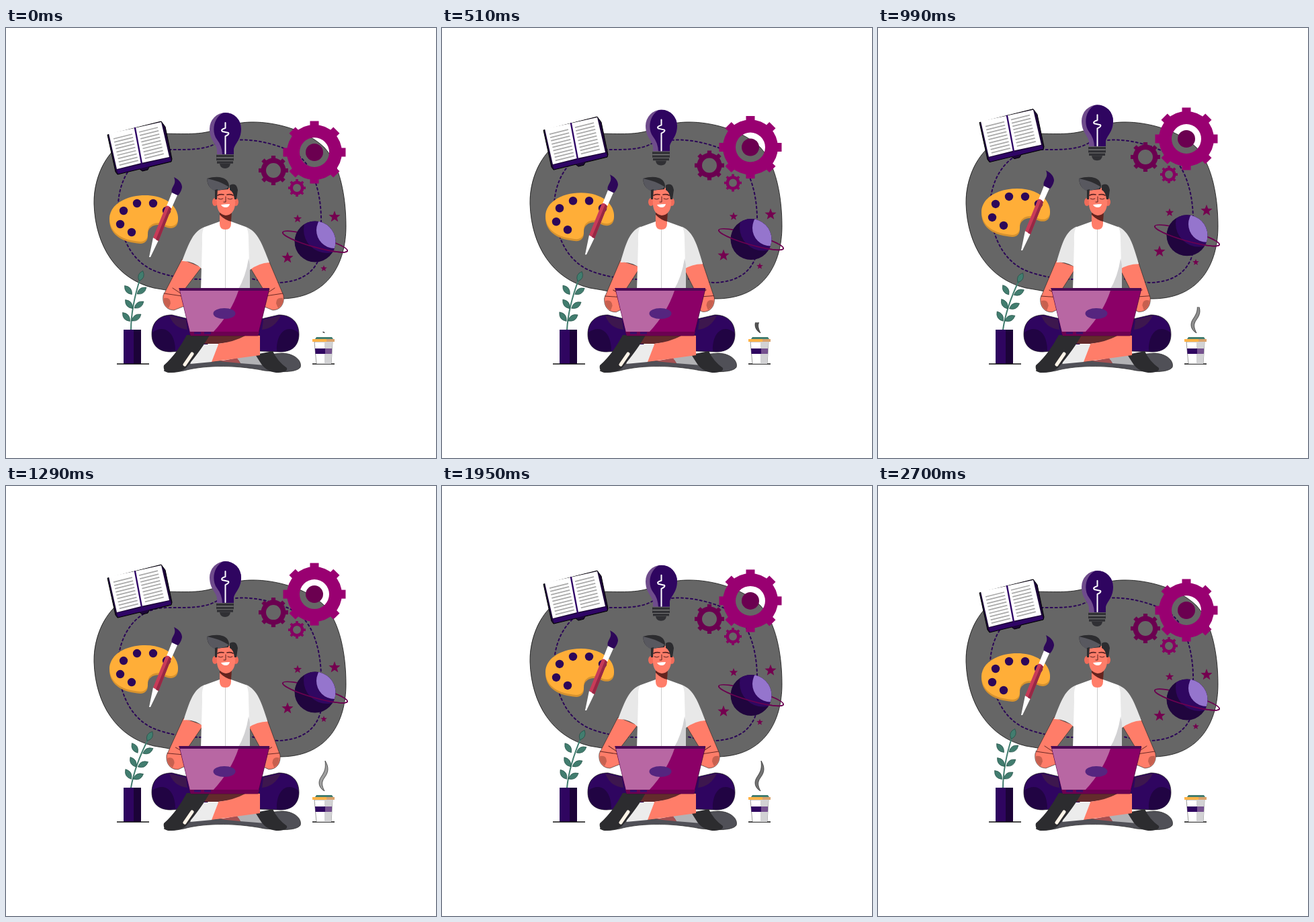
Write an HTML page that moves like this. It is 640 by 640 pixels and loops after 2760 ms.

```html
<!DOCTYPE html>
<html lang="en">
<head>
<meta charset="utf-8">
<title>Creative work</title>
<style>
  html, body { margin: 0; width: 100%; height: 100%; overflow: hidden; background: #fff; }
  svg { display: block; width: 100vw; height: 100vh; }
  .line { fill: none; stroke-linecap: round; stroke-linejoin: round; }
</style>
</head>
<body>
<svg viewBox="0 0 640 640">
  <defs>
    <clipPath id="globe"><circle cx="460" cy="318" r="30.5"/></clipPath>
    <clipPath id="reveal"><rect id="revealBox" x="460" width="26" height="60"/></clipPath>
    <clipPath id="glass"><path d="M314 188V181C313 172 303 167 303 150A23.5 24 0 0 1 350 150C350 167 340 172 339 181V188Z"/></clipPath>
  </defs>

  <path fill="#666" stroke="#111" stroke-width=".8" d="M131 262C130 215 158 157 220 157C262 157 285 160 310 152C338 142 352 140 368 140C400 140 446 151 474 178C497 203 506 250 506 295C506 350 480 402 410 403H300C270 396 245 391 220 387C165 374 133 325 131 262Z"/>
  <g class="line" stroke="#2b0657" stroke-width="2" stroke-dasharray="3 4">
    <path d="M314 171C296 182 270 181 240 181C190 181 166 228 167 268C170 320 193 353 228 364C256 373 275 374 300 374"/>
    <path d="M342 167C372 164 411 175 434 189C459 207 470 250 469 292C477 340 461 377 406 379Q385 378 365 373"/>
  </g>

  <g data-rise="22">
    <path fill="#1c0438" stroke="#000" d="M151 159L231 139 237 147 247 195 246 199 213 207 211 211 203 213 199 210 166 218 163 214Z"/>
    <path fill="#2f0566" d="M165 211L201 203 244 193 246 198 167 217Z"/>
    <path fill="#fff" d="M153 157L191 149 231 140 243 192 201 201 165 210Z"/>
    <path class="line" stroke="#2f0566" stroke-width="2.4" d="M192 149L202 202"/>
    <g id="rows" stroke="#aaa" stroke-width="1.8"></g>
  </g>

  <g data-rise="14">
    <g clip-path="url(#glass)">
      <path fill="#6f4c8c" d="M300 124h52v66h-52Z"/>
      <path fill="#2f0560" d="M326 125C309 131 305 154 314 166Q322 176 322 190H352V125Z"/>
    </g>
    <path class="line" stroke="#fff" stroke-width="2" d="M326.500 187V161Q333 158 331 156L322 154Q319 151 326.500 149V141"/>
    <path stroke="#777" stroke-width="13" d="M314 195h24"/>
    <path stroke="#303034" stroke-width="3.500" d="M313 190.500h26M313 195.500h26M314 200h24"/>
    <path fill="#303034" d="M318 202h16Q333 209 326 209T318 202Z"/>
  </g>

  <g id="gears" data-rise="24"></g>

  <g data-rise="12">
    <path id="palette" fill="#d6922f" transform="translate(0 3)" d="M154 284C154 263 178 249 207 249C236 249 257 264 256 285C254 296 245 297 235 292C224 287 211 292 211 304Q212 317 200 318C174 316 155 306 154 284Z"/>
    <use href="#palette" transform="translate(0 -3)" style="filter:brightness(1.19)"/>
    <g id="paints" fill="#2d0759"></g>
    <path fill="#2d0759" d="M247 246C244 236 255 234 250 222C257 225 262 231 262 237C261 243 258 247 256 249Z"/>
    <path fill="#fff" d="M247 245L255 249 246 269 239 265ZM219 312L227 316 215 341 213 341Z"/>
    <path fill="#c83b58" d="M238 265Q242 263 246 269L227 317 219 312Z"/>
    <path fill="#962845" d="M243 266L246 269 227 317 223 315Z"/>
  </g>

  <g data-rise="11">
    <ellipse class="line" cx="460" cy="318" rx="50" ry="8" transform="rotate(16 460 318)" stroke="#6b0050" stroke-width="1.700"/>
    <g clip-path="url(#globe)">
      <circle cx="460" cy="318" r="31" fill="#20053e"/>
      <circle cx="478" cy="300" r="35" fill="#300761"/>
      <circle cx="489" cy="301" r="27" fill="#9575cd"/>
    </g>
    <path class="line" transform="rotate(16 460 318)" stroke="#6b0050" stroke-width="1.700" d="M410 318A50 8 0 0 0 510 318"/>
    <g id="stars" fill="#74004f"></g>
  </g>

  <g id="plant" fill="#427d6f" stroke="#1d4a40" stroke-width=".6">
    <path class="line" stroke="#427d6f" stroke-width="2" d="M186 450Q186 415 200 372"/>
  </g>
  <path fill="#2f0560" d="M175 449h26v51h-26Z"/>
  <path fill="#1c0338" d="M190 449h11v51h-11Z"/>
  <path stroke="#111" stroke-width="1.500" d="M165 500h48M456 500h33"/>

  <path id="steam" clip-path="url(#reveal)" stroke="#222" stroke-width=".7" d="M475 409C481 419 480 426 474 434C469 441 470 446 474 454C465 449 464 440 469 433C475 424 476 420 475 409Z"/>
  <path fill="#fff" stroke="#333" stroke-width=".5" d="M459 467h27l-2 33h-22Z"/>
  <path fill="#d2d2d4" d="M474 467h12l-2 33h-10Z"/>
  <path fill="#2f0560" d="M460 477h25l-.5 8h-24Z"/>
  <path fill="#75518f" d="M475 477h10l-.5 8H475Z"/>
  <path fill="#427d6f" d="M460 463l2-3h23l2 3Z"/>
  <path fill="#ffb347" d="M456 463h33v4h-33Z"/>
  <path fill="#d9a26c" d="M477 463h12v4h-12Z"/>

  <!-- legs -->
  <path fill="#505057" stroke="#222" stroke-width=".7" d="M235 510C260 496 305 496 340 495C370 492 390 485 410 484C430 484 441 496 438 505C433 512 414 513 385 510C335 500 290 503 265 510Q242 515 235 510Z"/>
  <path fill="#2f0560" stroke="#111" stroke-width=".7" d="M217 456C217 437 229 427 247 427L300 440V478L245 482C227 482 217 472 217 456ZM436 456C436 437 424 427 406 427L350 440V480L408 482C426 482 436 472 436 456Z"/>
  <path fill="#210443" d="M218 453C236 440 252 453 252 480Q224 486 218 462ZM435 453C418 440 402 453 403 481Q431 485 435 462Z"/>
  <path fill="#3d174e" d="M243 428L268 434 270 449Q250 447 243 428ZM409 428L383 434 381 449Q400 447 409 428Z"/>
  <path fill="#b2b2b5" d="M344 491L374 486 386 502 349 499Z"/>
  <path fill="#a65052" d="M318 496L344 491 349 499Z"/>
  <path fill="#2c2c2f" d="M371 486L397 481Q404 496 418 506Q420 513 402 513Q386 511 378 497Z"/>
  <path fill="#632b2c" d="M298 457H377V462L316 470H292Z"/>
  <path fill="#ff7d69" d="M316 470Q340 467 356 458H378V487L305 497Z"/>
  <path fill="#ececec" d="M292 471H316L306 497 274 500Z"/>
  <path fill="#2c2c2f" d="M269 457H303Q293 476 268 506Q260 513 242 513Q233 511 235 502Q254 485 269 457Z"/>
  <path class="line" stroke="#fff4e8" stroke-width="5" d="M277 485L266 501"/>

  <!-- arms -->
  <g id="leftArm">
    <path fill="#ff7d69" stroke="#222" stroke-width=".6" d="M262 344L234 398C232 411 239 420 250 420L280 408V391L262 394 291 356Z"/>
    <path fill="#c7604f" d="M235 402Q245 400 245 410L242 417Q234 412 235 402Z"/>
    <path class="line" stroke="#6b2926" d="M248 387L260 395M235 395L262 399"/>
    <path fill="#e8e8e8" d="M296 296C279 302 273 318 262 347Q279 346 292 359L300 305Z"/>
  </g>
  <g id="rightArm">
    <path fill="#ff7d69" stroke="#222" stroke-width=".6" d="M391 346L413 398C415 411 408 420 397 420L368 408V391L386 394 363 356Z"/>
    <path fill="#c7604f" d="M412 402Q402 400 402 410L405 417Q413 412 412 402Z"/>
    <path class="line" stroke="#6b2926" d="M400 387L388 395M412 395L386 399"/>
    <path fill="#e8e8e8" d="M357 296C375 303 381 321 392 349Q376 350 363 360L354 305Z"/>
  </g>

  <!-- torso and head -->
  <path fill="#fff" d="M318 288L296 296Q291 299 292 320L290 390H363L361 315Q361 299 357 296L335 288Z"/>
  <path fill="#d2d2d4" d="M361 343L363 352V390H345Q357 370 361 343Z"/>
  <path stroke="#ccc" d="M326.500 299V388"/>
  <path fill="#ff7d69" d="M318 274h17v17Q335 300 326.500 300T318 291Z"/>
  <path fill="#64241f" d="M318 275Q332 276 336 274L335 288Q326 286 318 278Z"/>
  <g fill="#f06c5a"><ellipse cx="311" cy="259" rx="4" ry="6"/><ellipse cx="342" cy="259" rx="4" ry="6"/></g>
  <path fill="#ff7d69" d="M313 238H341V263Q339 278 327 279Q315 277 314 263Z"/>
  <path fill="#2c2c2f" d="M333 234Q343 229 345 241L343 255H340Q339 244 333 241Z"/>
  <path fill="#2c2c2f" d="M299 224Q309 221 318 222Q331 224 332 235L331 240 312 242Q300 239 299 224Z"/>
  <path fill="#58585f" d="M299 224Q316 227 331 236L329 239 311 243Q300 238 299 224Z"/>
  <path fill="#2c2c2f" d="M311 241L315 240 314 255H311Z"/>
  <g class="line" stroke="#572322">
    <path stroke-width="1.700" d="M315 249Q319 247 324 248M329 248Q334 247 338 249"/>
    <path d="M316 254Q320 256 323 254M330 254Q334 256 337 254M327 251V259H324"/>
  </g>
  <path fill="#fff" d="M320 263Q327 262 333 262Q332 267 327 267T320 263Z"/>

  <!-- laptop -->
  <path fill="#8b0067" stroke="#400038" stroke-width=".7" d="M258 388H392L375 458H275Z"/>
  <path fill="#b867a3" d="M259 391H346Q335 424 308 453H274Z"/>
  <path fill="#4c0b55" d="M257 387H392L391 391H259Z"/>
  <path fill="#6c0051" d="M273 452H377L375 458H275Z"/>
  <path stroke="#34106b" stroke-width="3" d="M280 454h10M295 454h10"/>
  <ellipse cx="325" cy="425" rx="16.500" ry="8" fill="#55257f"/>
</svg>

<script>
const LOOP = 2760, SPAN = 2700, STEP = 30;
const $ = id => document.getElementById(id);
const ease = x => (1 - Math.cos(Math.PI * Math.max(0, Math.min(1, x)))) / 2;

function add(parent, tag, attrs) {
  const node = document.createElementNS("http://www.w3.org/2000/svg", tag);
  for (const name in attrs) node.setAttribute(name, attrs[name]);
  $(parent).append(node);
}

function gear(x, y, radius, tip, hole, color) {
  const ring = r => `M${x - r} ${y}a${r} ${r} 0 1 0 ${2 * r} 0a${r} ${r} 0 1 0 ${-2 * r} 0Z`;
  const half = tip * .14;
  for (let i = 0; i < 8; i++) {
    add("gears", "rect", {
      x: x - half, y: y - tip, width: half * 2, height: tip - radius + 2,
      fill: color, transform: `rotate(${i * 45} ${x} ${y})`
    });
  }
  add("gears", "path", { d: ring(radius) + ring(hole), fill: color, "fill-rule": "evenodd" });
}

function star(x, y, size) {
  const points = Array.from({ length: 10 }, (_, i) => {
    const r = i % 2 ? size * .42 : size, a = i * Math.PI / 5 - Math.PI / 2;
    return [x + r * Math.cos(a), y + r * Math.sin(a)];
  });
  add("stars", "polygon", { points: points.join(" ") });
}

function leaf(x, y, angle, length = 8.5) {
  add("plant", "path", {
    d: `M${-length} 0Q0 -8 ${length} 0Q0 8 ${-length} 0Z`,
    transform: `translate(${x} ${y}) rotate(${angle})`
  });
}

for (let i = 0; i < 9; i++) {
  add("rows", "path", { d: `M${160 + i * 1.1} ${165 + i * 4.9}l28 -7m10 -3l28 -7` });
}
gear(398, 212, 18.5, 22, 11, "#6b0050");
gear(433, 238, 10.5, 13, 6, "#850062");
gear(459, 185, 41, 46.5, 22, "#990071");
add("gears", "circle", { cx: 459, cy: 185, r: 13, fill: "#6b0050" });
for (const [cx, cy] of [[175, 272], [195, 261], [219, 261], [239, 272], [170, 292], [187, 304]]) {
  add("paints", "circle", { cx, cy, r: 6.2 });
}
star(434, 284, 6.5);
star(489, 281, 9);
star(419, 342, 9);
star(473, 358, 5);
for (const [left, right, y] of [[182, 202, 390], [183, 198, 411], [179, 194, 430]]) {
  leaf(left, y, 50);
  leaf(right, y + 1, -35);
}
leaf(201, 369, -70, 8);

const floating = [...document.querySelectorAll("[data-rise]")];

function draw(now) {
  const t = Math.min(SPAN, Math.floor(now % LOOP / STEP) * STEP) / SPAN;
  const wave = ease(t < .5 ? t * 2 : 2 - t * 2);
  for (const group of floating) {
    group.setAttribute("transform", `translate(0 ${-group.dataset.rise * wave})`);
  }
  $("plant").setAttribute("transform", `rotate(${9.5 * wave} 187 449)`);

  const bend = 5.2 * (t < .25 ? ease(t * 4) : 1 - ease((t - .25) * 2));
  $("leftArm").setAttribute("transform", `rotate(${-bend} 290 302)`);
  $("rightArm").setAttribute("transform", `rotate(${bend} 362 302)`);

  const shown = t < .5 ? 3 + 44 * wave : 60;
  const gray = Math.round(50 + 110 * wave);
  $("revealBox").setAttribute("y", 455 - shown);
  $("steam").setAttribute("fill", `rgb(${gray},${gray},${gray})`);
  $("steam").setAttribute("opacity", t < .5 ? 1 : Math.min(1, (1 - t) * 8));
  requestAnimationFrame(draw);
}
requestAnimationFrame(draw);
</script>
</body>
</html>
```
